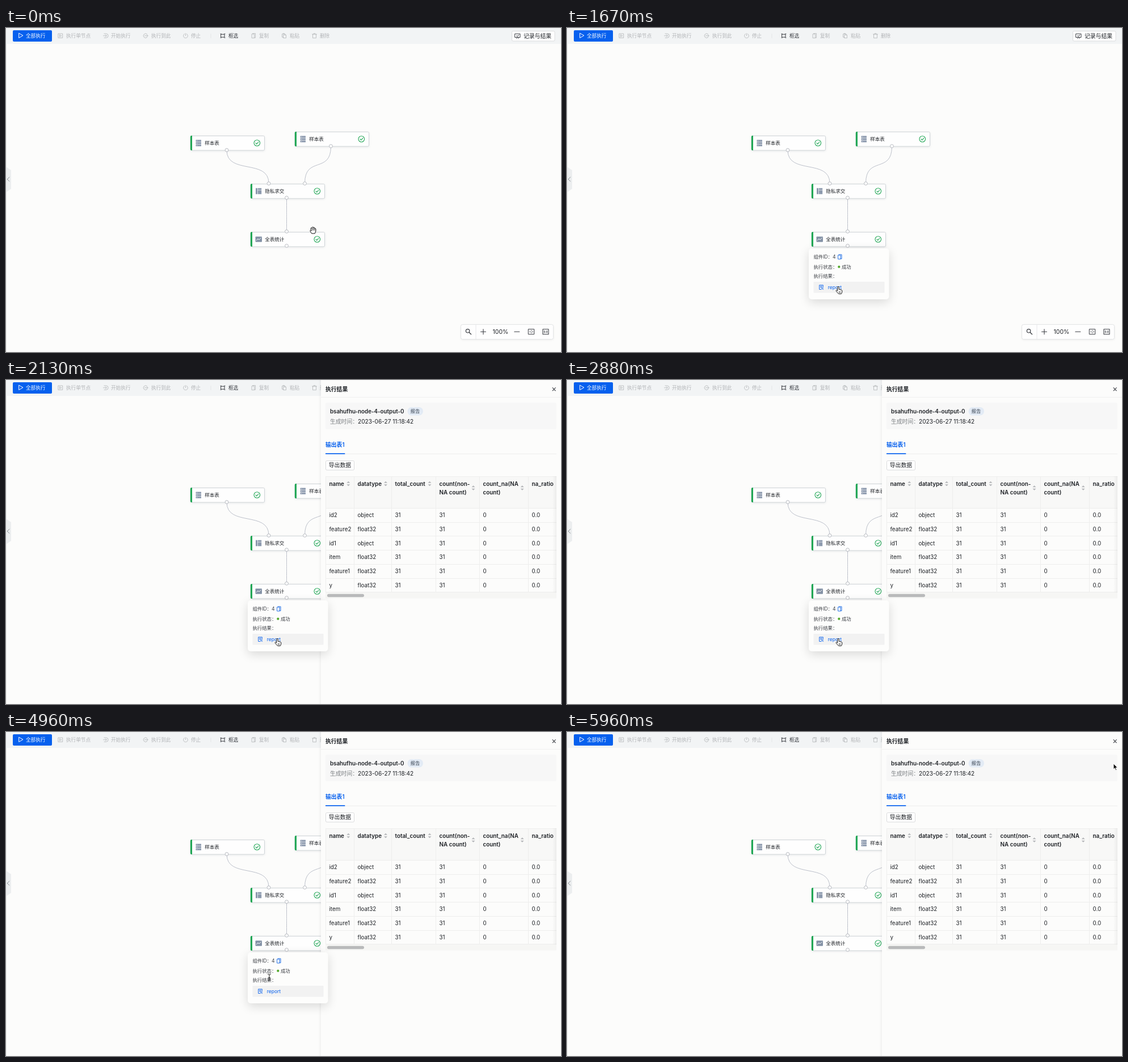
Animation, 978 px wide and 572 px high, one loop 6000 ms. Source, as an HTML page with a canvas:

```html
<!DOCTYPE html>
<html lang="zh">
<head>
<meta charset="utf-8">
<style>
html, body { margin: 0; width: 100%; height: 100%; overflow: hidden; background: #fcfcfb; }
canvas { display: block; width: 978px; height: 572px; }
</style>
</head>
<body>
<canvas id="stage"></canvas>
<script>
const W = 978, H = 572, LOOP = 6000;
const FONT = 'Inter, "Noto Sans CJK SC", "Noto Sans CJK", sans-serif';
const PAPER = '#fcfcfb', BLUE = '#0660ee', GREEN = '#23a757', INK = '#1d2025', DARK = '#3a3d43', MUTED = '#b2b4b7';
const cv = document.getElementById('stage'), c = cv.getContext('2d');
const dpr = window.devicePixelRatio || 1;
cv.width = W * dpr;
cv.height = H * dpr;

// ---- helpers ----
function text(s, x, y, size, color, weight = 400) {
  c.font = `${weight} ${size}px ${FONT}`;
  c.fillStyle = color;
  c.fillText(s, x, y + size * 0.37);
}
function rect(x, y, w, h, color) {
  c.fillStyle = color;
  c.fillRect(x, y, w, h);
}
function box(x, y, w, h, r, fill, stroke) {
  c.beginPath();
  c.roundRect(x, y, w, h, r);
  if (fill) { c.fillStyle = fill; c.fill(); }
  if (stroke) { c.lineWidth = 1; c.strokeStyle = stroke; c.stroke(); }
}
function shadow(blur, dx, dy, color, draw) {
  c.save();
  c.shadowBlur = blur * dpr;
  c.shadowOffsetX = dx * dpr;
  c.shadowOffsetY = dy * dpr;
  c.shadowColor = color;
  draw();
  c.restore();
}
function path(d, x, y, stroke, width = 0.9, fill) {
  c.save();
  c.translate(x, y);
  c.lineJoin = c.lineCap = 'round';
  const p = new Path2D(d);
  if (fill) { c.fillStyle = fill; c.fill(p); }
  if (stroke) { c.strokeStyle = stroke; c.lineWidth = width; c.stroke(p); }
  c.restore();
}
function disc(x, y, r, fill, stroke, width = 0.9) {
  c.beginPath();
  c.arc(x, y, r, 0, 7);
  if (fill) { c.fillStyle = fill; c.fill(); }
  if (stroke) { c.strokeStyle = stroke; c.lineWidth = width; c.stroke(); }
}
const clamp = v => Math.max(0, Math.min(1, v));
const span = (t, a, b) => clamp((t - a) / (b - a));
const easeOut = p => 1 - (1 - p) ** 4;
const smooth = p => p * p * (3 - 2 * p);

// ---- top bar ----
const COPY = 'M-2-4H3V3.5H1M-3-3H1V4H-3Z';
const TOOLS = [
  ['执行单节点', 96, 106, 'M-3.7-3.7H3.7V3.7H-3.7ZM-1.2-1.8L1.8 0-1.2 1.8Z'],
  ['开始执行', 175.5, 185, 'M-2.5-3.6H1A3.6 3.6 0 0 1 1 3.6H-2.5M-4 0H1.6M0-1.8L1.8 0 0 1.8'],
  ['执行到此', 246, 256, 'M2.6-2.8A3.8 3.8 0 1 0 2.6 2.8M-1.5 0H4M2.4-1.7L4.1 0 2.4 1.7'],
  ['停止', 316.5, 326, 'M-1.8-3.4A3.9 3.9 0 1 0 1.8-3.4M0-4V0'],
  ['框选', 382, 392, 'M-3-2.5H3V2.5H-3ZM-4-3.4h1.4M2.6-3.4H4M-4 3.4h1.4M2.6 3.4H4'],
  ['复制', 436.5, 446, COPY],
  ['粘贴', 490, 500, 'M-1-1.5H3.5V4H-1ZM-1 2.5H-3.5V-3H2V-1.5M-2-4H.5'],
  ['删除', 543.5, 553, 'M-4-2.6H4M-1.4-2.6V-4H1.4V-2.6M-3-2.6V4H3V-2.6']
];
function topBar() {
  rect(0, 0, W, 28, '#f2f4f5');
  box(12, 4, 69, 20, 2, BLUE);
  path('M-3-4L4 0-3 4Z', 26, 13.3, '#fff', 1);
  text('全部执行', 35, 13.8, 8.6, '#fff', 500);
  TOOLS.forEach(([label, ix, tx, icon], i) => {
    const color = i === 4 ? DARK : MUTED;
    path(icon, ix, 13.7, color, i === 4 ? 1 : 0.8);
    text(label, tx, 14, 8.6, color, i === 4 ? 500 : 400);
  });
  rect(360.5, 10, 1, 8, '#e4e6e8');
  box(891.5, 5.5, 75.5, 17.5, 2, '#fff', '#dcddde');
  path('M-4.5-3.7H4.5V2.5H-4.5ZM-2 4.5L0 2.5 2 4.5M-2-.4L-.5.8 2.5-1.8', 901.5, 14, DARK, 1);
  text('记录与结果', 912, 14.3, 9.8, INK);
}

// ---- flow graph ----
const ICONS = {
  table(x, y) {
    for (let i = 0; i < 3; i++) {
      box(x - 4.5, y - 5.5 + i * 4, 9.5, 3.2, 0.5, '#8d9aae');
      rect(x - 3, y - 4.2 + i * 4, 1.3, 0.8, '#e8ecf2');
    }
  },
  join(x, y) {
    rect(x - 5, y - 5.3, 3, 10.6, '#8d9aae');
    rect(x - 1.3, y - 5.3, 6.5, 3, '#8d9aae');
    rect(x - 1.3, y - 1.6, 6.5, 6.9, '#8d9aae');
  },
  stat(x, y) {
    box(x - 5.5, y - 4.8, 11.5, 9.6, 1, '#8492a6');
    path('M-3.7 2L-1-1 .8 1 4-2.2', x, y, '#fff', 1);
  }
};
const NODES = [
  [325, 190, '样本表', 'table'], [509, 183, '样本表', 'table'],
  [431, 275, '隐私求交', 'join'], [431, 360, '全表统计', 'stat']
];
const PORTS = [[389, 215.5], [572.5, 208.5], [463, 274.5], [526.5, 274.5], [494.5, 299.7], [494.5, 359.2], [494.5, 384.5]];
function edge(x1, y1, x2, y2) {
  const m = (y1 + y2) / 2, pull = (y2 - y1) / 4;
  c.beginPath();
  c.moveTo(x1, y1);
  c.bezierCurveTo(x1, m + pull, x2, m - pull, x2, y2);
  c.strokeStyle = '#b5b9c4';
  c.lineWidth = 0.9;
  c.stroke();
}
function graph() {
  edge(389, 216, 463, 274);
  edge(572.5, 209, 526.5, 274);
  edge(494.5, 300, 494.5, 359);
  for (const [x, y, label, icon] of NODES) {
    shadow(4, 0, 1, 'rgba(40,60,80,.12)', () => box(x + 0.5, y + 0.5, 130, 25.5, 2, '#fefefe'));
    box(x + 0.5, y + 0.5, 130, 25.5, 2, null, '#d0d5d8');
    box(x - 0.2, y, 3.2, 26, [2, 0, 0, 2], GREEN);
    ICONS[icon](x + 14, y + 13);
    text(label, x + 25.3, y + 13, 8.5, INK, 500);
    disc(x + 117.3, y + 13, 5.3, null, GREEN, 1.1);
    path('M-2.3 0L-.6 1.8 2.4-1.6', x + 117.3, y + 13, GREEN, 1.1);
  }
  for (const [x, y] of PORTS) disc(x, y, 2.9, '#fff', '#aeb2b8');
  path('M0 245L9 251V284L0 290Z', 0, 0, null, 0, '#eceeef');
  path('M2-3.6L-2 0 2 3.6', 4, 267, '#82868c', 0.9);
  rect(0, 28, 1, H - 28, '#eceded');
}
function zoomBar() {
  shadow(4, 0, 1, 'rgba(0,0,0,.08)', () => box(802, 524, 162.5, 25.5, 3, '#fefefe'));
  box(801.5, 523.5, 163, 26, 3, null, '#e3e5e6');
  rect(827.5, 524, 1, 25, '#e7e8e9');
  disc(813.6, 534.8, 3.2, null, DARK, 1.2);
  path('M0 0L3.6 3.6', 816, 537.2, DARK, 1.3);
  path('M-4.5 0H4.5M0-4.5V4.5', 841, 536.3, DARK, 1.1);
  text('100%', 857.5, 536.6, 10.5, INK);
  path('M-4.5 0H4.5', 900.3, 536.3, DARK, 1.1);
  path('M-5-4.5H5V4.5H-5Z', 925.7, 536.2, DARK, 1);
  path('M0-2.3V-1.3M0 1.3V2.3M-3 0H-1.6M1.6 0H3', 925.7, 536.2, DARK, 0.9);
  path('M-5-4.5H5V4.5H-5ZM-2.3-1.6V1.8M2.3-1.6V1.8M0-1V-.9M0 1.2V1.3', 951, 536.2, DARK, 1.1);
}

// ---- result drawer ----
const COLS = [563.5, 613.5, 679.5, 757.5, 834.5, 920.5];
const HEADS = [['name'], ['datatype'], ['total_count'], ['count(non-', 'NA count)'], ['count_na(NA', 'count)'], ['na_ratio']];
const SORTS = [[603.3, 183], [669, 183], [746.5, 183], [823.5, 190.5], [909.7, 190.5]];
const NAMES = ['id2', 'feature2', 'id1', 'item', 'feature1', 'y'];
function table() {
  c.save();
  c.beginPath();
  c.rect(563, 169, 407, 218);
  c.clip();
  rect(563, 170, 407, 56, '#f8f8f7');
  HEADS.forEach((lines, i) => lines.forEach((s, k) => text(s, COLS[i] + 6, 183 + k * 15.4, 9.9, INK, 600)));
  for (const [x, y] of SORTS) {
    path('M-3-1.2L0-4.3 3-1.2ZM-3 1.2L0 4.3 3 1.2Z', x, y, null, 0, '#b3b5b8');
  }
  NAMES.forEach((name, r) => {
    const y = 238.7 + r * 24.72;
    const type = name.startsWith('id') ? 'object' : 'float32';
    [name, type, '31', '31', '0', '0.0'].forEach((s, i) => text(s, COLS[i] + 6, y, 9.8, INK));
  });
  for (let r = 0; r < 7; r++) rect(563, Math.round(226 + r * 24.72), 407, 1, '#eeeeed');
  for (const x of COLS) rect(x - 0.5, 170, 1, 205, '#eeeeed');
  rect(563, 170, 407, 1, '#eeeeed');
  rect(563, 375, 407, 10.5, '#f6f6f4');
  box(566, 377.7, 65, 5.6, 2.8, '#b9babb');
  const g = c.createLinearGradient(963, 0, 970, 0);
  g.addColorStop(0, 'rgba(0,0,0,0)');
  g.addColorStop(1, 'rgba(0,0,0,.05)');
  rect(963, 170, 7, 205, g);
  c.restore();
}
function drawer(p) {
  if (p <= 0) return;
  c.save();
  c.translate((1 - p) * 424, 0);
  shadow(5, -1, 0, 'rgba(0,0,0,.07)', () => rect(555, -20, 440, H + 40, PAPER));
  text('执行结果', 563, 16, 9.8, INK, 600);
  path('M-2.6-2.6L2.6 2.6M2.6-2.6L-2.6 2.6', 965.7, 16.3, DARK, 1.1);
  rect(555, 30, 423, 1, '#f0f0f0');
  box(563, 40, 407, 47, 3, '#f7f7f7');
  text('bsahufhu-node-4-output-0', 571, 55, 9.8, INK, 600);
  box(707.5, 48, 27.5, 14.5, 7, '#e3ebf5');
  text('报告', 712.6, 55.2, 8.5, '#3c4756');
  text('生成时间：', 571, 73.4, 9.8, '#7d8084');
  text('2023-06-27 11:18:42', 620, 73.4, 10.1, INK);
  rect(563, 130, 407, 1, '#ededed');
  text('输出表1', 563, 114.8, 9.8, BLUE, 600);
  rect(563, 129.3, 34.3, 1.7, BLUE);
  box(563.5, 142.5, 50, 16.5, 2, '#fff', '#dadbdc');
  text('导出数据', 568.8, 150.8, 9.8, INK);
  table();
  c.restore();
}

// ---- node popover ----
function popover(p, active) {
  if (p <= 0) return;
  const link = active ? BLUE : DARK, s = 0.8 + 0.2 * p;
  c.save();
  c.globalAlpha = p;
  c.translate(496.5, 387);
  c.scale(s, s);
  c.translate(-496.5, -387);
  shadow(18, 0, 5, 'rgba(0,0,0,.14)', () => box(426, 389, 141.5, 90, 5, '#fdfdfc'));
  text('组件ID：', 434.5, 404, 8.4, DARK);
  text('4', 468, 404, 8.6, DARK);
  path(COPY, 481, 404, '#2673e6', 1, active ? null : '#9cc0f3');
  text('执行状态：', 434.5, 421.6, 8.4, DARK);
  disc(479.3, 421.7, 2.1, '#52a82a');
  text('成功', 484, 421.6, 8.4, DARK);
  text('执行结果：', 434.5, 437.7, 8.4, DARK);
  box(434.5, 448, 125, 19.5, 1, '#f2f2f2');
  path('M3.3-.5V-3.8H-3.3V3.8H0M-1.5-1.8H1.5M-1.5 0H0M1.8 3A1.4 1.4 0 1 0 1.7 3M2.8 3L3.8 4', 448, 457.7, link, 0.9);
  text('report', 459.7, 457.4, 8.5, link);
  c.restore();
}

// ---- mouse ----
const CURSORS = {
  grab(x, y) {
    path('M-2.6 5.5L-5 1.6q-.5-1.4.7-1.6.8 0 1.6 1.2L-4-2.8q0-1.5 1-1.5t1.4 1.2L-1.5-4.6q.3-1.2 1.2-1.2t1 1.2l.1 1.2q.2-1.6 1.2-1.6t1.1 1.4v1.6q.3-1.2 1.2-1 .9.2.8 1.6L4.8 2 3.4 5.5Z', x, y, '#111', 1, '#fff');
    path('M-1.4-3.2L-.8 0M.9-3.2V0M3.1-2V.3', x, y, '#111', 0.8);
  },
  pointer(x, y) {
    path('M-1.4.8a1.3 1.3 0 0 1 2.6 0V4.3l4 .9q1.8.5 1.6 2.3l-.6 3.2-.8 1.6H.6L-3.6 7.6q-.9-1.3.3-1.7.9-.2 1.9 1Z', x, y, '#111', 1, '#fff');
    path('M1.6 8V10.5M3.4 8V10.5', x, y, '#111', 0.7);
  },
  beam(x, y) {
    path('M-2.4-5.3Q0-5.3 0-4V4Q0 5.3-2.4 5.3M2.4-5.3Q0-5.3 0-4M0 4Q0 5.3 2.4 5.3M-1.2.8H1.2', x, y, '#222', 1);
  },
  arrow(x, y) {
    path('M0 0V9.8L2.3 7.7 3.9 11.4 5.6 10.7 4 7.1H7Z', x, y, '#fff', 0.9, '#111');
  }
};
const MOVES = [
  [0, 541, 357], [60, 541, 357], [330, 491, 374], [850, 491, 374], [1400, 478, 457],
  [4790, 478, 457], [4960, 464, 433], [5120, 452, 400], [5260, 500, 345],
  [5560, 760, 180], [5900, 963, 56], [6000, 963, 56]
];
function mouseAt(t) {
  const i = Math.max(1, MOVES.findIndex(m => m[0] > t));
  const [t0, x0, y0] = MOVES[i - 1], [t1, x1, y1] = MOVES[i];
  const through = t > 4960 && t < 5560;
  const p = span(t, t0, t1), k = through ? p : smooth(p);
  return [x0 + (x1 - x0) * k, y0 + (y1 - y0) * k];
}
const inside = (x, y, l, t, w, h) => x >= l && x <= l + w && y >= t && y <= t + h;
function cursorKind(x, y, pop, slide) {
  if (pop > 0 && inside(x, y, 426, 389, 141, 90)) {
    if (inside(x, y, 434, 448, 125, 20)) return 'pointer';
    return x < 503 ? 'beam' : 'arrow';
  }
  if (slide > 0 && x > 555) return 'arrow';
  return NODES.some(n => inside(x, y, n[0], n[1], 131, 26)) ? 'pointer' : 'grab';
}

function draw(t) {
  const slide = easeOut(span(t, 1710, 2050));
  const pop = t < 3000 ? easeOut(span(t, 200, 390)) : 1 - smooth(span(t, 5230, 5380));
  const [x, y] = mouseAt(t);
  c.setTransform(dpr, 0, 0, dpr, 0, 0);
  rect(0, 0, W, H, PAPER);
  graph();
  topBar();
  zoomBar();
  drawer(slide);
  popover(pop, t > 1340);
  CURSORS[cursorKind(x, y, pop, slide)](x, y);
}

const start = performance.now();
function tick() {
  draw((performance.now() - start) % LOOP);
  requestAnimationFrame(tick);
}
tick();
</script>
</body>
</html>
```
